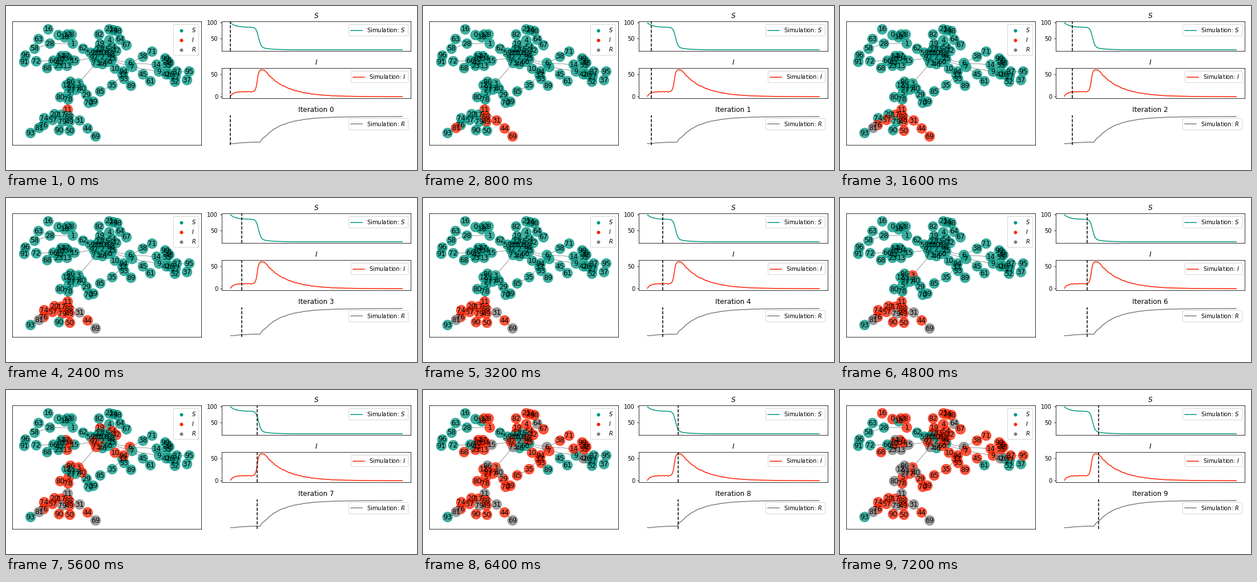
Animation of 720 by 288 pixels, one loop 8000 ms. Source, as a matplotlib script:

```python
import numpy as np
import matplotlib.pyplot as plt
from matplotlib.animation import FuncAnimation
from matplotlib.colors import to_rgba

W, H, DPI = 720, 288, 72
STEPS, INTERVAL = 10, 800
T_END = 45
NEVER = STEPS
COLORS = {"S": "#009682", "I": "#ff2000", "R": "#808080"}
NODE_ALPHA = 0.75

pos, infected = {}, {}


def branch(start, ids, *keys):
    """Spread nodes evenly along key points; all catch it at `start`."""
    u = np.linspace(0, len(keys) - 1, len(ids))
    xs, ys = (np.interp(u, range(len(keys)), axis) for axis in zip(*keys))
    for n, x, y in zip(ids, xs, ys):
        pos[n] = x, y
        infected[n] = start


# First outbreak, at the bottom
branch(0, [11], (108, 182))
branch(1, [88, 49], (110, 194), (111, 203))
branch(1, [31, 44, 69], (129, 201), (157, 229))
branch(1, [81], (58, 214))
branch(2, [17, 57, 76], (97, 191), (66, 209))
branch(2, [50], (112, 219))
branch(3, [74, 20, 79], (67, 197), (85, 190), (99, 203))
branch(4, [90], (93, 218))
branch(NEVER, [93], (43, 223))

# Bridge to the core
branch(6, [3], (127, 136))
branch(7, [80, 5, 78], (95, 160), (110, 153), (109, 164))
branch(7, [86, 40], (113, 133), (133, 145))
branch(8, [12, 97, 77], (106, 139), (122, 147))
branch(8, [29, 70, 39], (141, 156), (145, 170), (153, 168))

# Core
branch(7, [73, 92, 2], (158, 100), (154, 91), (168, 91))
branch(7, [19, 54, 42], (165, 67), (186, 72), (193, 79))
branch(7, [10, 94], (191, 110), (206, 115))
branch(8, [82, 22], (163, 50), (163, 76))
branch(8, [21, 24, 98], (181, 41), (195, 44))
branch(8, [4, 64, 67], (181, 60), (200, 59), (211, 69))
branch(8, [33, 53], (204, 121), (207, 128))
branch(8, [84], (184, 87))
branch(8, [35, 85], (186, 139), (165, 150))
branch(9, [75, 83, 60], (174, 77), (180, 82), (179, 98))
branch(9, [89], (219, 140))
branch(NEVER, [59, 36, 30], (148, 82), (168, 82))
branch(NEVER, [46, 25], (169, 102), (186, 93))

# West
branch(7, [47, 34, 13], (105, 88), (109, 92), (107, 105))
branch(8, [51, 65, 43, 23], (97, 88), (92, 105))
branch(8, [32, 8, 1], (107, 50), (115, 50), (117, 66))
branch(8, [68, 15], (72, 109), (120, 96))
branch(9, [16, 0], (74, 41), (92, 51))
branch(NEVER, [63, 58], (57, 58), (50, 75))
branch(NEVER, [28, 18, 62], (77, 66), (103, 55), (135, 75))
branch(NEVER, [96, 91], (34, 87), (32, 98))
branch(NEVER, [72, 66], (53, 97), (83, 96))

# East
branch(7, [6], (217, 100))
branch(8, [7, 38, 71], (221, 107), (240, 89), (256, 80))
branch(8, [14, 55, 41], (264, 103), (282, 104), (281, 120))
branch(8, [99, 56, 48], (279, 92), (286, 100))
branch(9, [45, 9], (240, 120), (268, 115))
branch(9, [87, 95], (299, 115), (321, 115))
branch(NEVER, [26, 27], (287, 120), (297, 124))
branch(NEVER, [61, 52, 37], (253, 132), (296, 133), (317, 130))

nodes = sorted(pos)
RECOVERED = {
    2: [81], 3: [31, 69], 5: [79], 7: [11],
    8: [86, 40, 15, 73, 2, 6, 64, 41],
    9: [12, 97, 80, 51, 43, 23, 13],
}
recovered = {n: when for when, group in RECOVERED.items() for n in group}

# Paths through the network
EDGES = [[63, 28, 1, 8], [58, 28], [72, 66, 15, 92], [3, 73], [2, 6, 38, 71],
         [2, 7, 9], [6, 14], [7, 45, 61], [85, 35, 33, 10], [78, 11, 31, 44, 69],
         [81, 93], [87, 95], [62, 59]]


def node_colors(step):
    def state(n):
        if step >= recovered.get(n, NEVER):
            return "R"
        return "I" if step >= infected[n] else "S"
    return [to_rgba(COLORS[state(n)], NODE_ALPHA) for n in nodes]


def sigmoid(x):
    return 1 / (1 + np.exp(-x))


def add_axes(left, top, width, height):
    return fig.add_axes([left / W, 1 - (top + height) / H, width / W, height / H])


fig = plt.figure(figsize=(W / DPI, H / DPI), dpi=DPI, facecolor="white")

# Network
LEFT, TOP, WIDTH, HEIGHT = 11.3, 27.1, 331, 216.9
net = add_axes(LEFT, TOP, WIDTH, HEIGHT)
net.set(xlim=(LEFT, LEFT + WIDTH), ylim=(TOP + HEIGHT, TOP), xticks=[], yticks=[])
for path in EDGES:
    net.plot(*zip(*(pos[n] for n in path)), color="#333333", lw=.5, zorder=1)
dots = net.scatter(*zip(*(pos[n] for n in nodes)), s=300, c=node_colors(0), zorder=2)
for n in nodes:
    net.text(*pos[n], str(n), fontsize=12, ha="center", va="center", zorder=3)
keys = [net.plot([], [], "o", color=c, mew=0, label=f"${k}$")[0]
        for k, c in COLORS.items()]
net.legend(handles=keys, loc="upper right").set_zorder(5)

# Curves: a small first outbreak, then the main wave around iteration 7
t = np.linspace(0, T_END, 451)
s = (15 + 14 * np.exp(-t / 1.3) + 63 * sigmoid((7.35 - t) / .33)
     + 7 * np.exp(-np.maximum(t - 8, 0) / 2.5))
i = ((1 + 10 * (1 - np.exp(-t / .7)) + 50 * sigmoid((t - 7) / .22))
     * np.exp(-np.maximum(t - 8.8, 0) / 5.5))
rng = np.random.default_rng(4)
knots = np.arange(0, T_END + .3, .3)
jitter = np.interp(t, knots, rng.uniform(-1, 1, len(knots)))
i = np.clip(i + jitter * np.sqrt(i) / 5, 0, 61)
r = np.maximum.accumulate(np.maximum(100 - s - i, 0))

panels = [("S", s, (15, 99), [50, 100]),
          ("I", i, (0, 61), [0, 50]),
          ("R", r, (0, 85), [])]
cursors = []
for row, (name, values, (low, high), ticks) in enumerate(panels):
    ax = add_axes(378.2, TOP + 82.35 * row, 330.9, 52.2)
    ax.plot(t, values, color=COLORS[name], label=f"Simulation: ${name}$")
    cursors.append(ax.axvline(0, color="black", ls="--"))
    pad = .05 * (high - low)
    ax.set(xlim=(-.05 * T_END, 1.05 * T_END), ylim=(low - pad, high + pad),
           xticks=[], yticks=ticks)
    ax.legend(loc="upper right")
    title = ax.set_title(f"${name}$")
ax.axis("off")


def update(step):
    dots.set_color(node_colors(step))
    for line in cursors:
        line.set_xdata([step, step])
    title.set_text(f"Iteration {step}")
    return [dots, title, *cursors]


anim = FuncAnimation(fig, update, frames=STEPS, interval=INTERVAL,
                     repeat=True, repeat_delay=0)
plt.show()
```
